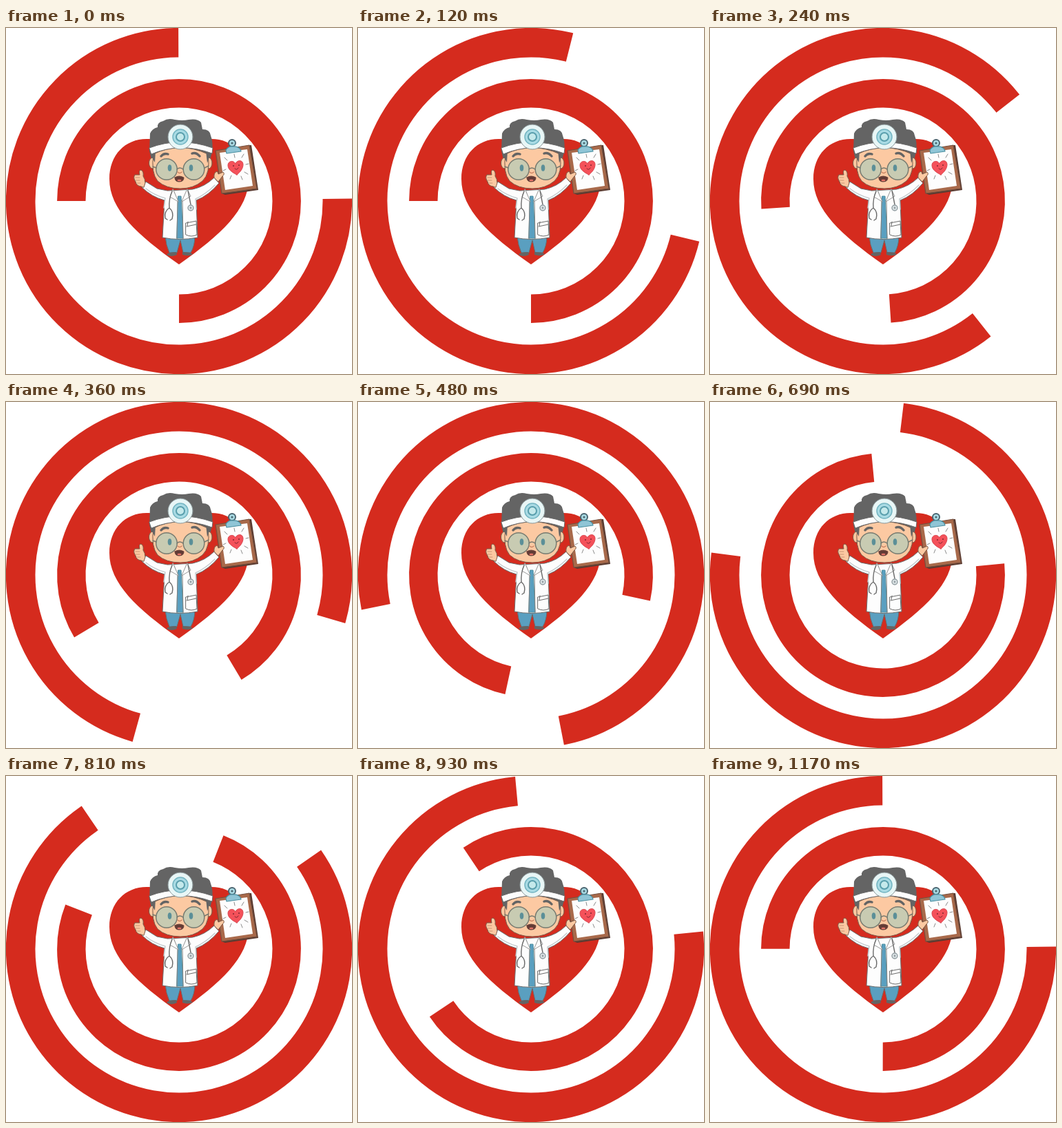
An HTML page with a canvas for the animation above (1.2 s loop, 502 by 502 pixels).

```html
<!DOCTYPE html>
<html lang="en">
<head>
<meta charset="utf-8">
<title>Heart doctor loader</title>
<style>
  html, body { margin: 0; width: 100%; height: 100%; overflow: hidden; background: #fff; }
  canvas { display: block; }
</style>
</head>
<body>
<canvas id="stage" width="502" height="502"></canvas>
<script>
const ctx = document.getElementById('stage').getContext('2d');
const RED = '#d52b1e', LINE = '#6a6a6a', HAIR = '#646464', SKIN = '#fcc9a2';
const WHITE = '#fdfdfd', BLUE = '#5a9fc0', PALE = '#a9dbe4', TEAL = '#4b8fa0';
const CENTER = 251, LOOP = 1200, STEP = 30, TURN = 1000, INNER_DELAY = 180;

function paint(path, fill, stroke, width = 1.2) {
  if (fill) { ctx.fillStyle = fill; ctx.fill(path); }
  if (stroke) { ctx.strokeStyle = stroke; ctx.lineWidth = width; ctx.stroke(path); }
}
const shape = (d, ...style) => paint(new Path2D(d), ...style);
function oval(x, y, rx, ry, ...style) {
  const path = new Path2D();
  path.ellipse(x, y, rx, ry, 0, 0, Math.PI * 2);
  paint(path, ...style);
}

function ring(radius, width, from, to, turn) {
  const rad = deg => (deg + turn) * Math.PI / 180;
  ctx.lineCap = 'butt';
  ctx.strokeStyle = RED;
  ctx.lineWidth = width;
  ctx.beginPath();
  ctx.arc(CENTER, CENTER, radius, rad(from), rad(to));
  ctx.stroke();
}

function drawHeart() {
  shape('M251 188C241 170 224 161 204 161C173 161 150 184 150 219C150 263 190 300 251 343C312 300 352 263 352 219C352 184 329 161 298 161C278 161 261 170 251 188Z', RED);
}

function drawClipboard() {
  shape('M350 170L356 170L366 235L318 242L313 240Z', '#5b3b31');
  shape('M304 178L353 170L364 233L313 240Z', '#a8694a', '#74503f');
  shape('M310 181L350 176L358 229L318 235Z', WHITE);
  oval(328, 167, 5, 5, PALE, '#4a6570', 2);
  oval(328, 167, 1.6, 1.6, '#4a6570');
  shape('M319 177Q323 171 329 172Q336 171 340 176L341 179L320 182Z', '#8fc5d6', TEAL);
  shape('M335 213C327 209 322 205 322 199C322 193 330 191 333 197C335 191 344 191 344 198C344 204 340 209 335 213Z', '#f4515a', '#d9474f', 1);
  oval(330, 200, 1, 1, '#7e2831');
  oval(338, 199, 1, 1, '#7e2831');
  shape('M332 204Q335 207 337 203', null, '#7e2831', 1);
  shape('M332 188L331 183M342 188L345 183M321 192L317 188M348 198L352 197M319 205L315 207M346 209L351 212M341 215L343 220M327 214L325 219', null, '#8b8b8b', 1);
}

function drawBody() {
  // trousers and shoes
  shape('M231 302L274 302Q274 316 268 326L257 326L253 308L248 326L237 326Q232 315 231 302Z', BLUE, LINE, 1);
  shape('M233 329Q235 325 247 325L248 329Q240 333 233 329Z', HAIR);
  shape('M256 325Q268 325 271 328Q266 332 256 329Z', HAIR);

  // coat with raised arms
  shape('M234 236L219 233L203 223L197 231Q211 245 230 250L227 304Q251 309 278 304L276 250Q294 243 309 225L302 217Q289 230 271 234Z', WHITE, LINE, 1);
  shape('M203 233Q214 242 231 247M275 248Q290 241 303 228M231 247L229 261M275 248L276 263', null, '#c5cdd0', 1.5);
  shape('M250 244L254 244L257 305L248 305Z', BLUE, TEAL, 1);
  shape('M243 235L249 252L248 306M263 235L256 252L257 306', null, '#808080', 1);
  shape('M242 234L238 245L250 252ZM263 234L268 244L255 252Z', WHITE, '#9a9a9a', 1);
  shape('M261 283L276 280L277 300Q269 304 261 300Z', WHITE, LINE, 1);
  shape('M262 288L276 285M264 281L263 287', null, LINE, 1);

  // stethoscope
  shape('M241 237Q236 248 237 261M237 261Q229 266 231 276L234 278M237 261Q244 267 241 277L238 279M264 236L268 256', null, LINE, 1.4);
  oval(268, 261, 4, 4, '#dce4e6', '#929da2', 1.4);
  oval(268, 261, 1.4, 1.4, '#929da2');

  // hands
  shape('M196 230Q189 229 188 223Q184 217 187 213L194 213Q192 206 196 206Q200 208 199 215Q202 219 202 225L200 231Z', SKIN, '#785947', 1);
  shape('M188 217L194 217M188 221L194 221M190 225L195 225', null, '#c99575', 1);
  shape('M302 217Q301 210 306 208Q308 210 308 212L315 209Q318 212 314 215L308 223Z', SKIN, '#785947', 1);
}

function drawHead() {
  shape('M208 178L209 153Q212 146 220 144Q219 137 228 135Q235 130 245 133Q256 135 265 133Q278 131 283 137L285 147Q296 147 297 156Q301 166 299 180L294 200L213 200Z', HAIR);
  oval(213, 196, 5.5, 8, SKIN, '#785947', 1);
  oval(294, 196, 5, 8, SKIN, '#785947', 1);
  shape('M214 183Q252 164 293 183Q297 211 285 222Q272 233 253 233Q232 233 220 222Q210 210 214 183Z', SKIN, '#785947', 1);
  shape('M211 180L217 178L216 195L212 188ZM290 178L297 180L294 190L292 196Z', HAIR);

  // headband and mirror
  shape('M208 174Q252 157 300 174L299 182Q253 165 211 183Z', WHITE, LINE, 1);
  oval(253, 158, 18, 18, '#e8f6f6', '#8a9799', 1);
  oval(253, 158, 11, 11, PALE, '#74b5c2', 1.5);
  oval(253, 158, 6, 6, '#c5e9eb', '#589eac', 2);

  // face and glasses
  shape('M225 186Q229 181 235 183M270 182Q276 180 281 186', null, HAIR, 3.4);
  for (const x of [233, 272.5]) oval(x, 205, 15.3, 15.3, '#c8cbb2', '#777b70', 1.5);
  shape('M248 205Q252 201 257 205M213 201L218 203M288 203L294 200', null, '#777b70', 1.5);
  oval(237.5, 203, 2.8, 4.8, '#5b8f98');
  oval(268.5, 203, 2.8, 4.8, '#5b8f98');
  shape('M249 209Q252 212 255 209', null, '#c98363', 1.2);
  shape('M245 217Q251 213 258 217Q258 223 251 223Q245 223 245 217Z', '#643c36', '#643c36', 1);
  oval(251.5, 221, 3, 1.3, '#e77568');
}

function turnAt(time) {
  const p = Math.min(1, Math.max(0, time / TURN));
  return 360 * p * p * (3 - 2 * p);
}

function draw(time) {
  ctx.fillStyle = '#fff';
  ctx.fillRect(0, 0, 502, 502);
  ring(229.8, 42.6, -0.8, 269.8, turnAt(time));
  ring(156.2, 41.4, 180, 450, -turnAt(time - INNER_DELAY));
  ctx.lineCap = ctx.lineJoin = 'round';
  drawHeart();
  drawClipboard();
  drawBody();
  drawHead();
}

const start = performance.now();
function tick() {
  const time = (performance.now() - start) % LOOP;
  draw(Math.floor(time / STEP) * STEP);
  requestAnimationFrame(tick);
}
tick();
</script>
</body>
</html>
```
